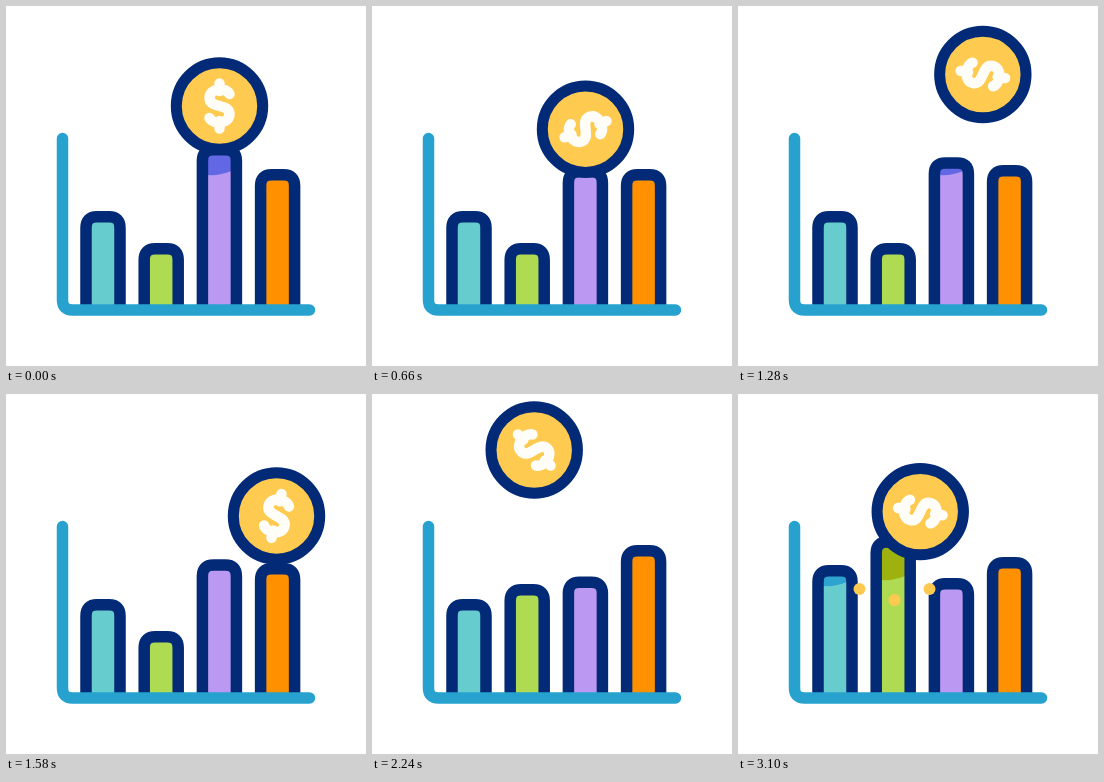
Write an HTML page that moves like this. It is 360x360 px and loops after 3.12 s.

```html
<!DOCTYPE html>
<html lang="en">
<head>
<meta charset="utf-8">
<title>Coin bouncing on a bar chart</title>
<style>
  html, body { margin: 0; width: 100%; height: 100%; overflow: hidden; background: #fff; }
  svg { display: block; width: 100vw; height: 100vh; }
  path { fill: none; stroke-linejoin: round; }
  .round { stroke-linecap: round; }
</style>
</head>
<body>
<svg id="stage" viewBox="0 0 360 360">
  <g id="bars"></g>
  <path class="round" d="M56.5 132.5V294Q56.5 304 66.5 304H303.5" stroke="#27a2cf" stroke-width="11.5"/>
  <g id="coin">
    <circle r="43.2" fill="#ffca50" stroke="#022a76" stroke-width="11"/>
    <path id="dollar" class="round" stroke="#fffdf7" stroke-width="10.5"
      d="M10-12C6-19-10-18-10-8C-10 3 10-3 10 8C10 18-6 19-10 12M0-22.5V-15M0 15V22.5"/>
  </g>
  <g id="sparks"></g>
</svg>
<script>
const LOOP = 3120, STEP = 20;
const $ = id => document.getElementById(id);

function add(parent, tag, attrs = {}) {
  const el = document.createElementNS('http://www.w3.org/2000/svg', tag);
  for (const k in attrs) el.setAttribute(k, attrs[k]);
  return parent.appendChild(el);
}

const smooth = u => u * u * (3 - 2 * u);
const speedUp = u => u * u;
const slowDown = u => 1 - (1 - u) ** 2;
const glideOut = u => 1 - (1 - u) ** 3;

// Value along [time, value] stops, eased by whether the value grows or shrinks.
function path(stops, grow = smooth, shrink = smooth) {
  return t => {
    const next = stops.findIndex(s => s[0] > t);
    if (next === 0) return stops[0][1];
    if (next < 0) return stops[stops.length - 1][1];
    const [t0, a] = stops[next - 1], [t1, b] = stops[next];
    return a + (b - a) * (b > a ? grow : shrink)((t - t0) / (t1 - t0));
  };
}

// The coin falls faster and faster, rises slower and slower.
const coinX = path([[960, 213.5], [1560, 270.5], [1760, 270.5], [2640, 151], [2800, 151], [3400, 213.5]],
  smooth, glideOut);
const coinY = path([[140, 100], [680, 125], [1200, 66], [1600, 128], [1680, 128],
  [2250, 56], [2690, 130], [3050, 130], [3620, 56]], speedUp, slowDown);
const coinAngle = path([[140, 0], [900, 90], [1200, 90], [1650, 200], [2700, 88], [2980, 88], [3500, 170]]);

// Bars push up smoothly and settle back; above "edge" a raised bar is darker.
const barTop = stops => path(stops, slowDown, smooth);
const bars = [
  { fill: '#66cccd', cap: '#2ea3cf', edge: 190, top: barTop([[2240, 205], [2640, 175], [3100, 171]]) },
  { fill: '#aedb52', cap: '#9db20f', edge: 184,
    top: barTop([[1700, 237], [2640, 160], [2940, 164], [3110, 142]]) },
  { fill: '#bb99f2', cap: '#6267e3', edge: 167, top: barTop([[140, 138], [680, 160], [1040, 137], [2500, 184]]) },
  { fill: '#ff9100', cap: '#f26a52', edge: 159,
    top: barTop([[1000, 163], [1280, 159], [1600, 169], [1840, 115], [2640, 163]]) }
];
bars.forEach((b, i) => {
  b.x = 97 + 58.2 * i;
  b.body = add($('bars'), 'path', { style: `fill:${b.fill}` });
  b.shade = add($('bars'), 'path', { style: `fill:${b.cap}` });
  b.line = add($('bars'), 'path', { stroke: '#022a76', 'stroke-width': 11.5 });
});

const bursts = [{ start: 1760, x: 269, y: 161 }, { start: 3000, x: 156.5, y: 195 }];
for (const b of bursts)
  b.dots = [-1, 0, 1].map(() => add($('sparks'), 'circle', { fill: '#fdc950' }));

function drawBar(b, t) {
  const top = b.top(t), y = top + 5.75, l = b.x - 17, r = b.x + 17;
  const outline = `M${l} 303V${y + 11}Q${l} ${y} ${l + 11} ${y}H${r - 11}Q${r} ${y} ${r} ${y + 11}V303`;
  b.body.setAttribute('d', outline);
  b.line.setAttribute('d', outline);
  b.shade.setAttribute('d', b.edge > top + 10
    ? `M${b.x - 12} ${y}h24V${b.edge - 2}Q${b.x} ${b.edge + 3} ${b.x - 12} ${b.edge + 2}Z` : '');
}

function drawBurst(b, t) {
  const p = (t - b.start) / 200;
  const radius = p > 0 && p < 1 ? 6 * Math.min(1, p * 4, (1 - p) * 2.5) : 0;
  b.dots.forEach((dot, i) => {
    const side = i - 1;
    dot.setAttribute('cx', b.x + side * (30 + 10 * p));
    dot.setAttribute('cy', b.y + (side ? 0 : 6 + 10 * p));
    dot.setAttribute('r', radius);
  });
}

function draw(t) {
  bars.forEach(b => drawBar(b, t));
  bursts.forEach(b => drawBurst(b, t));
  $('coin').setAttribute('transform', `translate(${coinX(t)} ${coinY(t)})`);
  $('dollar').setAttribute('transform', `rotate(${coinAngle(t)})`);
}

const begin = performance.now();
function tick() {
  const t = (performance.now() - begin) % LOOP;
  draw(Math.floor(t / STEP) * STEP);
  requestAnimationFrame(tick);
}
tick();
</script>
</body>
</html>
```
